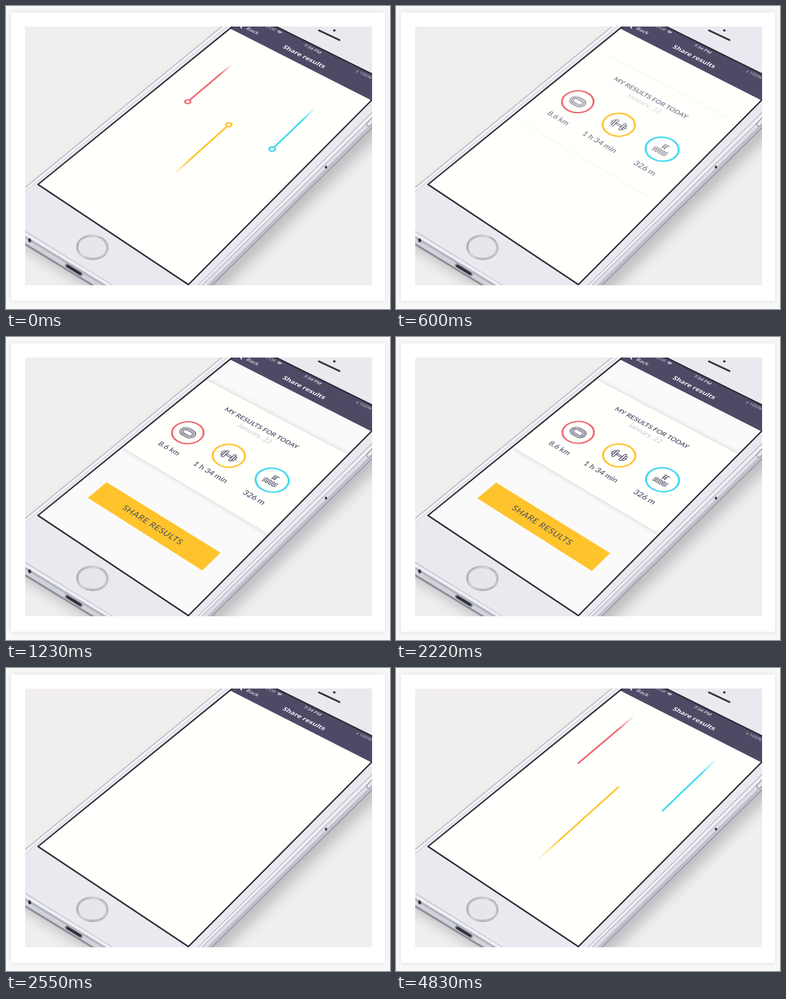
Recreate the animation shown at these times as an HTML page with a canvas. Size 600 by 472 pixels, loop 4860 ms.

```html
<!DOCTYPE html>
<html lang="en">
<head>
<meta charset="utf-8">
<title>Workout results</title>
<style>
html, body { margin: 0; width: 100%; height: 100%; overflow: hidden; background: #f8f8f8; }
canvas { display: block; width: 600px; height: 472px; }
</style>
</head>
<body>
<canvas id="stage"></canvas>
<script>
const LOOP = 4860, W = 375, H = 603, ROW = 244.5, BAR_TOP = -71;
const INK = '#4f4a66', PAPER = '#fffffb', YELLOW = '#ffc42c';
const SANS = 'Lato, "Open Sans", sans-serif';
const BAR = '"Open Sans", Lato, sans-serif';
const canvas = document.getElementById('stage');
const ctx = canvas.getContext('2d');
const dpr = window.devicePixelRatio || 1;
canvas.width = 600 * dpr;
canvas.height = 472 * dpr;

const clamp = x => Math.max(0, Math.min(1, x));
const span = (t, a, b) => clamp((t - a) / (b - a));
const easeOut = x => 1 - (1 - x) ** 3;
const easeInOut = x => x < 0.5 ? 4 * x ** 3 : 1 - 4 * (1 - x) ** 3;
const mix = (a, b, k) => a + (b - a) * k;

// Perspective of the phone: the area below the title bar is W x H units.
const lens = quad([350, 35], [571, 147], [285, 434], [50, 278]);

function quad([x0, y0], [x1, y1], [x2, y2], [x3, y3]) {
  const ax = x1 - x2, ay = y1 - y2, bx = x3 - x2, by = y3 - y2;
  const sx = x0 - x1 + x2 - x3, sy = y0 - y1 + y2 - y3;
  const den = ax * by - bx * ay;
  const g = (sx * by - bx * sy) / den, h = (ax * sy - sx * ay) / den;
  return { a: x1 - x0 + g * x1, b: x3 - x0 + h * x3, c: x0,
           d: y1 - y0 + g * y1, e: y3 - y0 + h * y3, f: y0, g, h };
}

function map(x, y) {
  const u = x / W, v = y / H, m = lens, w = 1 + m.g * u + m.h * v;
  return [(m.a * u + m.b * v + m.c) / w, (m.d * u + m.e * v + m.f) / w, w];
}

// Draw with the local tilt of the screen at a point.
function at(x, y, draw) {
  const [px, py, w] = map(x, y), m = lens;
  ctx.save();
  ctx.transform((m.a - m.g * px) / w / W, (m.d - m.g * py) / w / W,
                (m.b - m.h * px) / w / H, (m.e - m.h * py) / w / H, px, py);
  draw();
  ctx.restore();
}

function poly(points) {
  ctx.beginPath();
  points.forEach(p => ctx.lineTo(p[0], p[1]));
  ctx.closePath();
}

function fill(points, color) {
  poly(points);
  ctx.fillStyle = color;
  ctx.fill();
}

function line(x1, y1, x2, y2, color, width) {
  ctx.beginPath();
  ctx.moveTo(x1, y1);
  ctx.lineTo(x2, y2);
  ctx.strokeStyle = color;
  ctx.lineWidth = width;
  ctx.stroke();
}

function ellipse(x, y, rx, ry, tilt = 0) {
  ctx.beginPath();
  ctx.ellipse(x, y, rx, ry, tilt, 0, 7);
}

const rect = (x1, y1, x2, y2) => [map(x1, y1), map(x2, y1), map(x2, y2), map(x1, y2)];

function text(str, x, y, font, color, spacing = 0) {
  at(x, y, () => {
    ctx.font = font;
    ctx.letterSpacing = spacing + 'px';
    ctx.fillStyle = color;
    ctx.textAlign = 'center';
    ctx.textBaseline = 'middle';
    ctx.fillText(str, 0, 0);
    ctx.letterSpacing = '0px';
  });
}

function shadow(color, blur, dx = 0, dy = 0) {
  ctx.shadowColor = color;
  ctx.shadowBlur = blur * dpr;
  ctx.shadowOffsetX = dx * dpr;
  ctx.shadowOffsetY = dy * dpr;
}

function backdrop() {
  ctx.fillStyle = '#f8f8f8';
  ctx.fillRect(0, 0, 600, 472);
  ctx.save();
  shadow('rgba(0,0,0,.1)', 8);
  ctx.fillStyle = '#fff';
  ctx.fillRect(8, 10, 584, 449);
  ctx.restore();
  ctx.fillStyle = '#f1eeee';
  ctx.fillRect(30, 32, 542, 403);
}

function phone() {
  const body = [[10, 299], [352, 20], [620, 20], [620, 143], [300, 457], [170, 457], [10, 360]];
  ctx.save();
  shadow('rgba(125,125,132,.42)', 20, 10, 12);
  fill(body, '#d0d1d9');
  ctx.restore();

  // metal side, right
  [[-20, '#f2f2f6', 4], [-15, '#aeb0bb', 2], [-11, '#dfe0e7', 6], [-6, '#bcbec9', 3], [-1, '#9a9ca8', 2]]
    .forEach(([k, color, w]) => line(620, 143 + k, 300, 457 + k, color, w));
  // metal side, bottom
  [[-17, '#f0f0f4', 4], [-12, '#b2b4be', 3], [-7, '#d2d3da', 5], [-1, '#8e9099', 3]]
    .forEach(([k, color, w]) => line(10, 360 + k, 170, 457 + k, color, w));

  fill([[10, 299], [352, 20], [620, 20], [620, 118], [290, 445], [184, 446], [10, 338]], '#e9e9ef');
  line(10, 338, 184, 446, '#c8c9d2', 1.2);
  line(620, 118, 290, 445, '#bfc1cb', 1.4);
  line(10, 299, 352, 20, '#b9bbc4', 1.5);
  line(10, 302, 356, 20, '#f8f8fb', 2);
  line(10, 305, 360, 20, '#cfd0d8', 1);

  // ports, microphone and side key
  ctx.fillStyle = '#34343c';
  ellipse(37, 365, 2.3, 3.2, -0.3);
  ctx.fill();
  ellipse(500, 251, 1.8, 2.3);
  ctx.fill();
  ctx.lineCap = 'round';
  line(95, 404, 117, 418, '#8d8f9a', 6);
  line(96, 405, 116, 417, '#2e2e36', 4);
  line(567, 184, 580, 171, '#8f919d', 8);
  line(567, 184, 580, 171, '#e3e4ea', 5.5);

  // earpiece and camera
  line(489, 38, 521, 53, '#34343d', 3);
  ctx.lineCap = 'butt';
  ellipse(513, 38, 2.2, 1.8);
  ctx.fillStyle = '#34343d';
  ctx.fill();

  // home button
  const metal = ctx.createLinearGradient(112, 362, 158, 392);
  metal.addColorStop(0, '#77787f');
  metal.addColorStop(0.4, '#b4b5bb');
  metal.addColorStop(0.65, '#808188');
  metal.addColorStop(1, '#a3a4ab');
  ellipse(135, 376, 25, 19.6, 0.05);
  ctx.fillStyle = metal;
  ctx.fill();
  ellipse(135, 376, 23.8, 18.4, 0.05);
  ctx.fillStyle = '#f8f8fa';
  ctx.fill();
  ellipse(135, 376, 22.4, 17.1, 0.05);
  ctx.fillStyle = '#e7e6eb';
  ctx.fill();
  ctx.strokeStyle = metal;
  ctx.lineWidth = 1;
  ctx.stroke();

  fill(rect(0, BAR_TOP, W, H), PAPER);
}

function titleBar() {
  fill(rect(0, BAR_TOP, W, 0), '#4e4965');
  text('Share results', 186, -24.5, '700 17px ' + BAR, '#f3f2f6');
  text('Back', 45, -24.5, '600 14px ' + BAR, '#dddbe4');
  text('7:34 PM', 185.5, -58, '600 12px ' + BAR, '#e6e4ec');
  text('NDOR', 67, -58, '11.5px ' + BAR, '#cfcdd8');
  text('100%', 323.5, -58, '12px ' + BAR, '#cfcdd8');
  at(15, -24.5, () => {
    ctx.beginPath();
    ctx.moveTo(5, -8);
    ctx.lineTo(-4, 0);
    ctx.lineTo(5, 8);
    ctx.strokeStyle = '#f3f2f6';
    ctx.lineWidth = 3;
    ctx.stroke();
  });
  at(94.5, -54.5, () => {
    ctx.strokeStyle = '#e0dee7';
    ctx.lineWidth = 2;
    [2, 5.2, 8.4].forEach(r => {
      ctx.beginPath();
      ctx.arc(0, 0, r, -2.35, -0.79);
      ctx.stroke();
    });
  });
  at(303, -58, () => {
    ctx.beginPath();
    [[-2, -2], [2, 2], [0, 4], [0, -4], [2, -2], [-2, 2]].forEach(p => ctx.lineTo(...p));
    ctx.strokeStyle = '#a5a2b4';
    ctx.lineWidth = 0.9;
    ctx.stroke();
  });
}

function screenEdge() {
  poly(rect(0, BAR_TOP, W, H));
  ctx.lineJoin = 'round';
  ctx.strokeStyle = '#2b2a33';
  ctx.lineWidth = 2.2;
  ctx.stroke();
}

function bars(list) {
  list.forEach(([x, y, w, h, r]) => {
    ctx.beginPath();
    ctx.roundRect(x, y, w, h, r);
    ctx.stroke();
  });
}

function track() {
  bars([[-18, -12.5, 36, 25, 12.5], [-14.5, -9, 29, 18, 9], [-11, -5.5, 22, 11, 5.5]]);
}

function dumbbell() {
  bars([[-7, -2, 14, 4, 0], [-12, -11, 5, 22, 2], [7, -11, 5, 22, 2],
        [-16, -7, 4, 14, 1.5], [12, -7, 4, 14, 1.5]]);
  ctx.beginPath();
  [-1, 1].forEach(s => {
    ctx.moveTo(s * 16, 0);
    ctx.lineTo(s * 20, 0);
  });
  ctx.stroke();
}

function pool() {
  ctx.beginPath();
  for (let row = 0; row < 3; row++) {
    for (let x = -16; x <= 16; x++) {
      const y = 3 + row * 4.5 + Math.sin(x * 0.78) * 1.4;
      x === -16 ? ctx.moveTo(x, y) : ctx.lineTo(x, y);
    }
  }
  [-3, 3].forEach(x => {
    ctx.moveTo(x, -2);
    ctx.lineTo(x, -13);
    ctx.arc(x + 2, -13, 2, Math.PI, 0);
  });
  [-5, -9].forEach(y => {
    ctx.moveTo(-3, y);
    ctx.lineTo(3, y);
  });
  ctx.stroke();
}

const items = [
  { x: 78, color: '#ee6a72', from: 0, lag: 16, label: '8.6 km', drift: 0, icon: track },
  { x: 186.5, color: YELLOW, from: H, lag: 0, label: '1 h 34 min', drift: 0, icon: dumbbell },
  { x: 296, color: '#43d9f2', from: 0, lag: 16, label: '326 m', drift: 20, icon: pool }
];

function streak({ x, color, from, lag }, t) {
  const head = easeInOut(span(t, 4245, 4815));
  const tail = easeInOut(span(t, 4690 + lag, 5030 + lag));
  if (head <= 0 || tail >= 1) return;
  const a = map(x, mix(from, ROW, tail)), b = map(x, mix(from, ROW, head));
  const fade = ctx.createLinearGradient(a[0], a[1], b[0], b[1]);
  fade.addColorStop(0, color + '00');
  fade.addColorStop(0.3, color);
  fade.addColorStop(1, color);
  line(a[0], a[1], b[0], b[1], fade, 2.6);
}

function ring({ x, color, icon }, y, r, alpha) {
  at(x, y, () => {
    ellipse(0, 0, r, r);
    ctx.fillStyle = PAPER;
    ctx.fill();
    ctx.strokeStyle = color;
    ctx.lineWidth = Math.min(4, r);
    ctx.stroke();
    ctx.globalAlpha = alpha;
    ctx.strokeStyle = INK;
    ctx.lineWidth = 1.7;
    icon();
  });
}

function card(t, lift) {
  const top = 88.5 - lift, bottom = 363 - lift;
  const grey = span(t, 600, 1140) * (1 - span(t, 2340, 2550));
  ctx.save();
  ctx.globalAlpha = grey;
  fill(rect(0, 0, W, H), '#fafafb');
  shadow('rgba(60,55,75,.2)', 9);
  fill(rect(0, top, W, bottom), PAPER);
  ctx.restore();

  const half = 188 * easeOut(span(t, 250, 1000));
  if (half <= 0) return;
  [top, bottom].forEach(y => {
    const a = map(W / 2 - half, y), b = map(W / 2 + half, y);
    line(a[0], a[1], b[0], b[1], 'rgba(70,65,85,.07)', 1);
  });
}

function button(t, lift) {
  const y = 455.5 + 150 * (1 - easeOut(span(t, 600, 1110))) + lift;
  if (y > H) return;
  fill(rect(43, y, 331, y + 54), YELLOW);
  text('SHARE RESULTS', 188, y + 28, '18px ' + SANS, INK, 1);
}

function results(t) {
  const lift = t < 1830 ? 0 : 400 * 2 ** (18 * ((t - 1830) / 720 - 1));
  const settle = 1 - easeOut(span(t, 150, 1200));
  const alpha = span(t, 300, 700);
  const y = 15 * settle - lift;
  card(t, lift);
  items.forEach(item => streak(item, t + LOOP));
  const r = 33 * easeOut(span(t, -30, 470));
  items.forEach(item => r > 0 && ring(item, ROW - lift, r, alpha));
  ctx.globalAlpha = alpha;
  text('MY RESULTS FOR TODAY', 190, 137 + y, '600 16.2px ' + SANS, INK);
  text('January, 22', 189, 159 + y, '17.2px ' + SANS, '#c9c8d3');
  items.forEach(({ x, label, drift }) =>
    text(label, x + drift * settle, 305 + y, '500 17.9px ' + SANS, INK));
  ctx.globalAlpha = 1;
  button(t, lift);
}

function frame(now) {
  const t = now % LOOP;
  ctx.setTransform(dpr, 0, 0, dpr, 0, 0);
  backdrop();
  ctx.save();
  ctx.beginPath();
  ctx.rect(30, 32, 542, 403);
  ctx.clip();
  phone();
  ctx.save();
  poly(rect(0, 0, W, H));
  ctx.clip();
  if (t < 2550) results(t);
  else items.forEach(item => streak(item, t));
  ctx.restore();
  titleBar();
  screenEdge();
  ctx.restore();
}

const start = performance.now();
(function tick() {
  frame(performance.now() - start);
  requestAnimationFrame(tick);
})();
</script>
</body>
</html>
```
